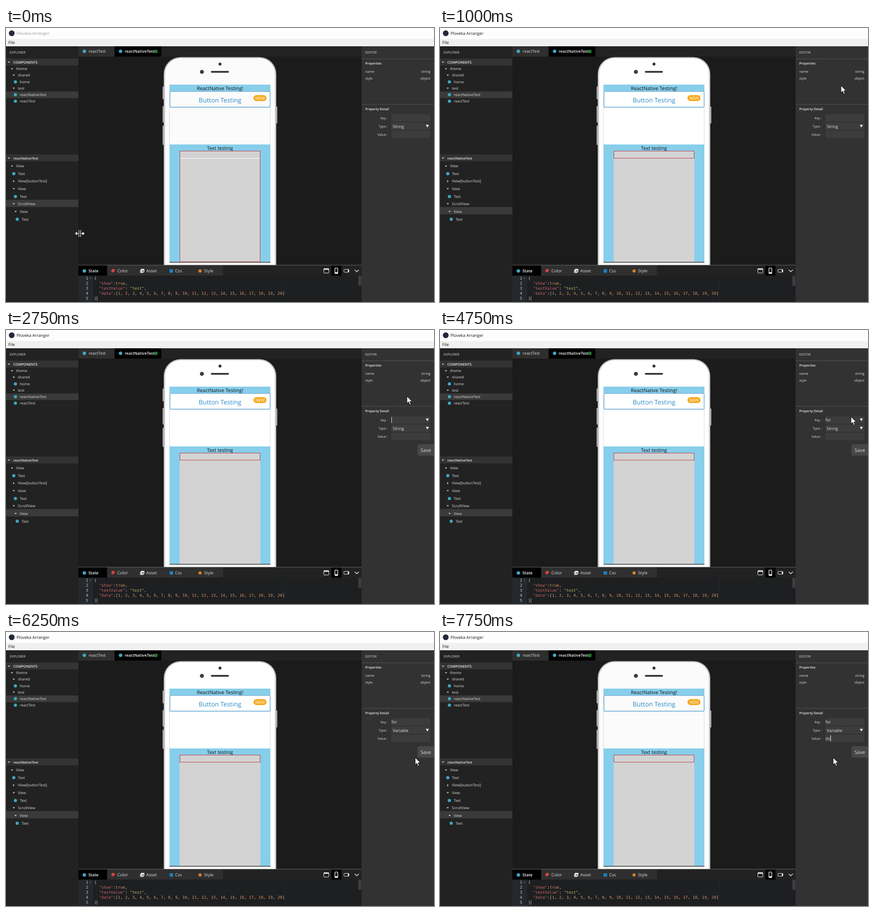
An HTML page for the animation above (8000 ms loop, 934 by 600 pixels).

```html
<!DOCTYPE html>
<html lang="en">
<head>
<meta charset="utf-8">
<title>UI builder</title>
<style>
  html, body { margin: 0; width: 100%; height: 100%; overflow: hidden; background: #1b1b1b; }
  svg { display: block; width: 934px; height: 600px; }
  text { font-family: "Open Sans", "Noto Sans", sans-serif; white-space: pre; text-rendering: geometricPrecision; }
  .mono { font-family: "DejaVu Sans Mono", monospace; }
</style>
</head>
<body>
<svg id="stage" viewBox="0 0 934 600" xmlns="http://www.w3.org/2000/svg"></svg>
<script>
const LOOP = 8000, STEP = 250;
const stage = document.getElementById('stage');

const rect = (x, y, w, h, fill, extra = '') =>
  `<rect x="${x}" y="${y}" width="${w}" height="${h}" fill="${fill}" ${extra}/>`;
const frame = (x, y, w, h, color, extra = '') =>
  rect(x, y, w, h, 'none', `stroke="${color}" ${extra}`);
const dot = (x, y, r, fill, extra = '') =>
  `<circle cx="${x}" cy="${y}" r="${r}" fill="${fill}" ${extra}/>`;
const path = (d, fill, extra = '') => `<path d="${d}" fill="${fill}" ${extra}/>`;
const text = (x, y, str, size, fill = '#ddd', extra = '') =>
  `<text x="${x}" y="${y}" font-size="${size}" fill="${fill}" ${extra}>${str}</text>`;
const group = (id, body) => `<g id="${id}">${body}</g>`;
const BOLD = 'font-weight="600"', MID = 'text-anchor="middle"', END = 'text-anchor="end"';
const CYAN = '#41a5c4';

const caretDown = (x, y) => path(`M${x - 2.5} ${y - 1.2}h5l-2.5 2.8z`, '#ddd');
const caretRight = (x, y) => path(`M${x - 1.2} ${y - 2.5}v5l2.8-2.5z`, '#ddd');
const selectArrow = y => path(`M916 ${y}h7l-3.5 6z`, '#e4e4e4');

function treeRow([kind, x, y, label]) {
  const mark = kind === 'leaf' ? dot(x, y, 3.5, CYAN)
    : kind === 'shut' ? caretRight(x, y) : caretDown(x, y);
  return mark + text(x + (kind === 'leaf' && x !== 17 ? 9.5 : 9), y + 2.9, label, 8.1);
}

function titleBar() {
  return rect(0, 0, 934, 24, '#fdfdfd') + rect(0, 24, 934, 16, '#f0f0f0') +
    dot(12.5, 11.5, 6.3, '#23283a') +
    text(23, 15, 'Ploveka Arranger', 9, '#111', 'id="title"') +
    text(5, 34.6, 'File', 9, '#111');
}

function explorer() {
  const rows = [
    ['open', 13, 89.5, 'theme'], ['open', 17, 103.5, 'shared'], ['leaf', 20.5, 118, 'home'],
    ['open', 17, 132, 'test'], ['leaf', 20.5, 146, 'reactNativeTest'], ['leaf', 20.5, 160.3, 'reactTest'],
    ['open', 13, 302.5, 'View'], ['leaf', 17, 319, 'Text'], ['shut', 17, 335.5, 'View[buttonTest]'],
    ['open', 17, 352, 'View'], ['leaf', 20.5, 369, 'Text'], ['open', 17, 385, 'ScrollView'],
    ['open', 21, 402, 'View'], ['leaf', 24.5, 418.7, 'Text']
  ];
  return rect(0, 40, 158, 560, '#222') +
    text(8, 55.8, 'EXPLORER', 7.2) +
    rect(0, 67, 158, 15, '#333') + caretDown(6.5, 75) + text(16, 77.6, 'COMPONENTS', 7.6, '#eee', BOLD) +
    rect(0, 139, 158, 14.5, '#3a3a3a') +
    rect(0, 277, 158, 15, '#333') + caretDown(6.5, 285) + text(16, 287.5, 'reactNativeTest', 7.2, '#eee', BOLD) +
    rect(0, 376, 158, 16, '#3a3a3a', 'id="treeSel"') +
    rows.map(treeRow).join('');
}

function phone() {
  const button = (x, y, h) => rect(x, y, 3, h, '#b9bbbe', 'rx="1"');
  return '<g clip-path="url(#view)">' +
    button(341.8, 128, 28) + button(341.8, 171, 36) + button(341.8, 214, 42) + button(589, 172, 37) +
    rect(344, 63.5, 246, 520, '#8f9296', 'rx="37"') +
    rect(345.2, 64.7, 243.6, 520, '#d9dbdd', 'rx="36"') +
    rect(347.5, 66.5, 239, 520, '#fff', 'rx="34" class="paper"') +
    dot(467, 79, 3.2, '#35373b') + dot(427.5, 96, 4.3, '#2f3136') + dot(427.5, 96, 1.8, '#4b5360') +
    rect(447, 94, 39.5, 4, '#3a3b3e', 'rx="2"') +
    rect(356.5, 124, 220.5, 390, '#c9cccf') +
    rect(357.3, 124, 219, 390, '#fff', 'class="paper"') +
    rect(357, 124, 220, 14.5, '#87ceeb') +
    text(467, 135.8, 'ReactNative Testing!', 10.8, '#111', MID) +
    frame(357.8, 139, 218.6, 34.4, '#3c8fc4', 'rx="1.5" stroke-width="1.1"') +
    text(467, 163, 'Button Testing', 13.8, '#2a8bc6', MID) +
    rect(540, 147, 28.5, 13, '#f5a81c', 'rx="6.5"') + text(554.3, 157, 'NEW', 9.3, '#fff', MID) +
    rect(357, 255, 220, 257.5, '#87ceeb') +
    text(467, 266.8, 'Text testing', 10.7, '#111', MID) +
    rect(379, 269, 176, 243.5, '#d3d3d3') +
    rect(357, 512.3, 220, 1.4, '#222') +
    rect(380, 285, 174, 1, '#fff', 'id="rowLine"') +
    frame(379.5, 269.5, 175, 15.5, '#bd3a42', 'id="pick"') +
    '</g>';
}

function tabs() {
  return rect(158, 40, 618, 22.5, '#222') + rect(158, 40, 78.5, 22.5, '#2e2e2e') +
    rect(237, 40, 102, 22.5, '#000') +
    dot(171, 51, 3.8, CYAN) + text(180.5, 54.3, 'reactTest', 8.85) +
    dot(250, 51, 3.8, CYAN) + text(259, 54.3, 'reactNativeTest', 8.6, '#fff', BOLD) +
    dot(327, 51.2, 4, '#20772c');
}

function dockBar() {
  const petals = [0, 60, 120].map(a =>
    `<path d="M423.5 528v8" stroke="#f09222" stroke-width="1.8" transform="rotate(${a} 423.5 532)"/>`).join('');
  const label = (x, str) => text(x, 535.3, str, 9.3);
  return rect(158, 519, 618, 23.5, '#222') + rect(221, 519, 252.5, 23.5, '#2f2f2f') +
    rect(158, 519, 62.5, 23.5, '#000') + rect(158, 518.8, 618, 1, '#666') +
    dot(171, 532, 3.8, CYAN) + text(180, 535.3, 'State', 8.8, '#fff', BOLD) +
    path('M230 532a4 4 0 1 1 8-1c0 2-3 1-3 3s-5 2-5-2z', '#d9413a') + label(243, 'Color') +
    rect(292.5, 529.5, 7.5, 7, '#bbb', 'rx="1"') + rect(294.3, 527.5, 7.7, 7, '#eee', 'rx="1"') +
    path('M295.5 533l2-2.5 1.2 1.2 1.2-1.5 1.5 2.8z', '#444') + label(306, 'Asset') +
    rect(357, 528.3, 7.5, 7.5, '#1f7fc4') + label(369, 'Css') +
    petals + label(432, 'Style') +
    rect(710, 520, 22, 22.5, '#000') +
    frame(693.5, 527, 11, 9.5, '#eee', 'rx="1"') + rect(693.5, 526.8, 11, 2.6, '#eee') +
    frame(717.8, 525.6, 6.2, 12, '#fff', 'rx="1.2" stroke-width="1.3"') + rect(718, 535, 6, 2.3, '#fff') +
    frame(737.5, 528.6, 10.5, 6.2, '#eee', 'rx="1"') + rect(746, 529, 2.5, 5.5, '#eee') +
    path('M761 529.5l4.5 4.3 4.5-4.3', 'none', 'stroke="#eee" stroke-width="1.4"');
}

function codePane() {
  const span = (color, str) => `<tspan fill="${color}">${str}</tspan>`;
  const key = k => span('#cc6666', `  "${k}"`);
  const nums = Array.from({ length: 20 }, (_, i) => span('#de935f', i + 1)).join(', ');
  const lines = ['{',
    key('show') + ':' + span('#de935f', 'true') + ',',
    key('testValue') + ': ' + span('#b5bd68', '"test"') + ',',
    key('data') + ':[' + nums + ']', '}'];
  return rect(158, 542.5, 618, 57.5, '#1d1f21') + rect(158, 542.5, 32, 57.5, '#25282c') +
    rect(609, 542.5, 1, 57.5, '#25282c') + rect(769, 542.5, 6.5, 22, '#3d3f41') +
    lines.map((line, i) => {
      const y = 551.2 + 11 * i;
      return text(179.5, y, i + 1, 8.64, '#c5c8c6', 'class="mono" ' + END) +
        text(192.5, y, line, 8.64, '#c5c8c6', 'class="mono"');
    }).join('') +
    path('M182.5 547.3h3.6l-1.8 2.2z', '#777') + rect(198.2, 587.5, 1, 10, '#aaa');
}

function editor() {
  const field = (y, label) => text(833, y + 11.3, label, 7.2, '#ddd', END) + rect(841, y, 85, 16, '#3c3c3c');
  return rect(776, 40, 158, 560, '#323232') +
    text(784, 55.8, 'EDITOR', 7.1) + rect(776, 67, 158, 1, '#555') +
    text(784, 80.4, 'Properties', 7.1, '#eee', BOLD) +
    rect(776, 103, 158, 14.5, '#414141', 'id="hover"') +
    text(784, 98, 'name', 7.4) + text(926, 98, 'string', 7.5, '#ddd', END) +
    text(784, 113, 'style', 7.4) + text(926, 113, 'object', 7.6, '#ddd', END) +
    rect(776, 166.5, 158, 1, '#555') + text(784, 179.8, 'Property Detail', 7.1, '#eee', BOLD) +
    field(189, 'Key :') + field(207, 'Type :') + field(225, 'Value :') +
    text(841, 200.4, '', 9, '#e4e4e4', 'id="key"') +
    text(844, 218.6, 'String', 9, '#e4e4e4', 'id="type"') +
    text(841, 236.5, '', 9, '#e4e4e4', 'id="value"') +
    selectArrow(212) + group('keyArrow', selectArrow(193.7)) +
    rect(841, 190.5, 1, 13, '#eee', 'id="keyCaret"') + rect(841, 226.5, 1, 13, '#eee', 'id="valueCaret"') +
    group('save', rect(898, 250, 40, 25, '#474747', 'rx="4"') + text(904.7, 267, 'Save', 10.6));
}

function popups() {
  const types = ['String', 'Number', 'Boolean', 'Object', 'Variable'];
  return group('menu', rect(799.5, 122, 106.5, 43, '#000') + rect(800, 122.5, 103, 40, '#191919') +
      text(808.5, 138, 'Add Property', 8.2) + text(808.5, 154, 'Delete Property', 8.2)) +
    group('list', rect(841, 223, 85, 90, '#3c3c3c', 'stroke="#222"') +
      rect(841.5, 0, 84, 18, '#1e6fc8', 'id="listSel"') +
      types.map((s, i) => text(844, 235.3 + 18 * i, s, 9, '#e4e4e4')).join(''));
}

function pointers() {
  const line = 'stroke="#fff" stroke-width="1.3"';
  return group('resize', rect(157.5, 441, 7, 18, '#000') +
      path('M159.3 442v16M162.8 442v16M153 450h5M164 450h5', 'none', line) +
      path('M150.5 450l4.5-3.8v7.6zM171.5 450l-4.5-3.8v7.6z', '#fff')) +
    group('arrow', path('M0 0V15.6L3.6 12.2 6.2 18.4 8.7 17.3 6.1 11.4H11Z', '#fff', 'stroke="#000" stroke-width=".9"'));
}

stage.innerHTML = '<clipPath id="view"><rect x="158" y="62" width="618" height="457"/></clipPath>' +
  rect(158, 40, 618, 480, '#1b1b1b') + phone() + titleBar() + explorer() + tabs() +
  dockBar() + codePane() + editor() + popups() + pointers();

const el = {};
stage.querySelectorAll('[id]').forEach(n => el[n.id] = n);
const papers = stage.querySelectorAll('.paper');
const show = (name, on) => el[name].setAttribute('display', on ? 'inline' : 'none');
const set = (name, attr, v) => el[name].setAttribute(attr, v);

// time, x, y: the pointer rests at each place until the next
const moves = [
  [250, 70, 402], [500, 420, 300], [750, 800, 170], [1000, 875, 126], [1250, 842, 120],
  [1500, 800, 108], [1750, 800, 122], [2000, 857, 127], [2250, 848, 130], [2750, 875, 145],
  [4500, 889, 170], [4750, 897, 190], [5000, 898, 212], [5500, 880, 262], [5750, 868, 300],
  [6250, 893, 275], [6500, 872, 238], [6750, 858, 230], [7000, 858, 275]
];
const latest = (list, t) => list.filter(e => e[0] <= t).pop();
const keyTyping = [[0, ''], [3750, 'fo'], [4000, 'for']];
const valueTyping = [[0, ''], [7250, 't'], [7500, 'th'], [7750, 'thi']];

function typed(name, list, t) {
  const str = latest(list, t)[1];
  if (el[name].textContent !== str) el[name].textContent = str;
  set(name + 'Caret', 'x', 841 + (str ? el[name].getComputedTextLength() : 0));
}

function draw(time) {
  const t = Math.floor(time % LOOP / STEP) * STEP;
  const within = (a, b) => t >= a && t < b;
  const start = t < 250;

  set('title', 'fill', start ? '#999' : '#111');
  set('treeSel', 'y', start ? 376 : 392);
  set('pick', 'height', start ? 242.5 : 15.5);
  show('rowLine', start);
  papers.forEach(p => p.setAttribute('fill', start || t >= 7000 ? '#fbfbfb' : '#fff'));

  show('resize', start);
  show('arrow', !start);
  const at = latest(moves, t);
  if (at) set('arrow', 'transform', `translate(${at[1]} ${at[2]})`);

  show('hover', t === 1500);
  show('menu', within(1750, 2750));
  show('save', t >= 2750);
  show('keyArrow', within(2750, 5000));
  show('keyCaret', within(2750, 3000) || within(3250, 4500));
  show('valueCaret', t >= 6750);
  typed('key', keyTyping, t);
  typed('value', valueTyping, t);

  show('list', within(5250, 6000));
  set('listSel', 'y', t < 5500 ? 223.5 : t < 5750 ? 259 : 295);
  el.type.textContent = t < 6000 ? 'String' : 'Variable';
}

function tick() {
  draw(performance.now());
  requestAnimationFrame(tick);
}
tick();
</script>
</body>
</html>
```
